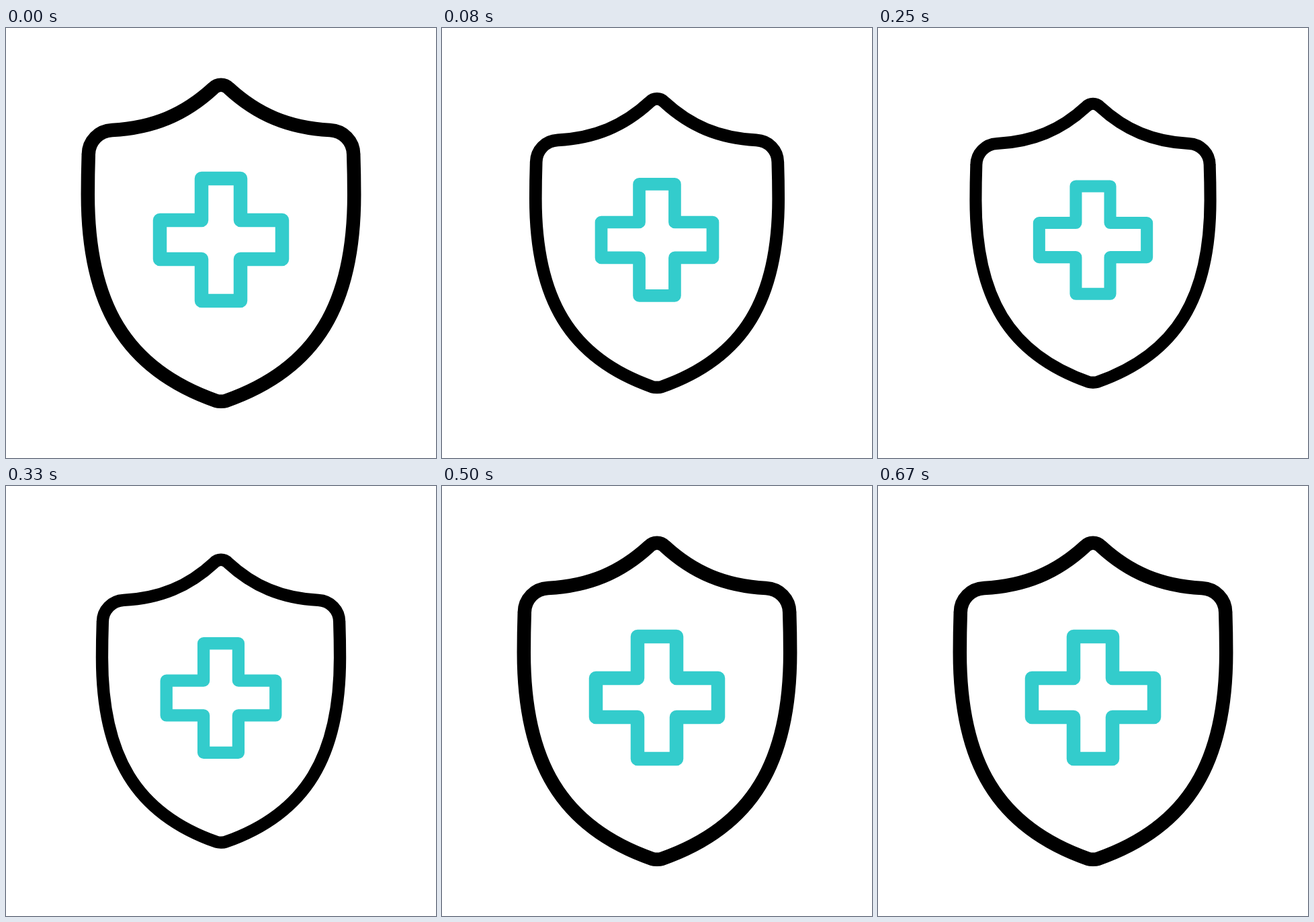
An HTML page with a canvas that plays this animation: 640x640 px, repeating every 1.54 s.

```html
<!DOCTYPE html>
<html lang="en">
<head>
<meta charset="utf-8">
<title>Shield pulse</title>
<style>
  html, body { margin: 0; width: 100%; height: 100%; overflow: hidden; background: #fff; }
  canvas { display: block; width: 100vw; height: 100vh; object-fit: contain; }
</style>
</head>
<body>
<canvas id="stage" width="640" height="640"></canvas>
<script>
const ctx = document.getElementById('stage').getContext('2d');
const LOOP = 1540;
const MID = 320;

const shield = new Path2D(`M308.5 89.6 C315 83 325 83 331.5 89.6
  C374.5 129.3 421.5 148.7 482 152 C502 153 517 168.5 517.2 188
  C518 212 518.2 236 518.2 248 C518.2 410 463 507.5 327 555
  C324 556 316 556 313 555 C177 507.5 121.8 410 121.8 248
  C121.8 236 122 212 122.8 188 C123 168.5 138 153 158 152
  C218.5 148.7 265.5 129.3 308.5 89.6 Z`);

const cross = new Path2D(`M291 224 H349 V286 H411 V344 H349 V406
  H291 V344 H229 V286 H291 Z`);

// One dip: decelerate down until `low`, then accelerate back up.
function dip(step, start, low, end, depth) {
  const u = step < low ? (low - step) / (low - start) : (step - low) / (end - low);
  return depth * (1 - Math.pow(u, 2.6));
}

function scaleAt(step) {
  if (step < 12) return 1 - dip(step, 0, 5, 12, 0.12);
  if (step < 16) return 1 - dip(step, 12, 14, 16, 0.05);
  return 1;
}

// 24 steps per second, with step times rounded to 10 ms.
const stepAt = ms => Math.floor((Math.floor(ms / 10) * 10 + 4.9) * 0.024);

function stroke(path, color, width) {
  ctx.strokeStyle = color;
  ctx.lineWidth = width;
  ctx.stroke(path);
}

function draw(ms) {
  const s = scaleAt(stepAt(ms));
  ctx.setTransform(1, 0, 0, 1, 0, 0);
  ctx.fillStyle = '#fff';
  ctx.fillRect(0, 0, 640, 640);
  ctx.translate(MID, MID);
  ctx.scale(s, s);
  ctx.translate(-MID, -MID);
  ctx.lineJoin = 'round';
  stroke(shield, '#000', 20.5);
  stroke(cross, '#33cccc', 20.5);
}

let origin = null;
function tick(now) {
  if (origin === null) origin = now;
  draw((now - origin) % LOOP);
  requestAnimationFrame(tick);
}
draw(0);
requestAnimationFrame(tick);
</script>
</body>
</html>
```
